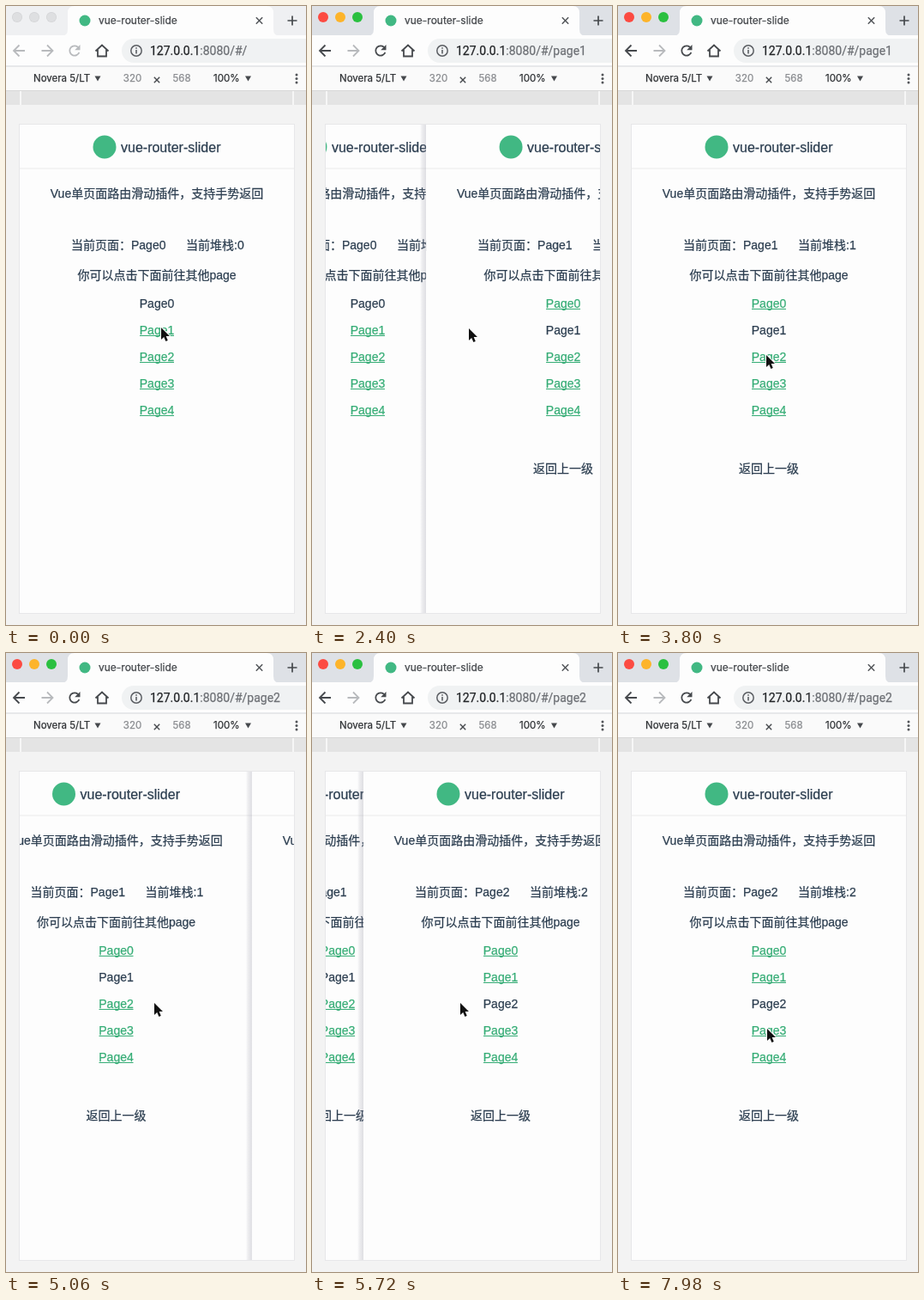
Animation, 350 px wide and 720 px high, one loop 8 s. Source, as an HTML page with a canvas:

```html
<!DOCTYPE html>
<html lang="zh">
<head>
<meta charset="utf-8">
<title>vue-router-slider</title>
<style>
html, body { margin: 0; width: 100%; height: 100%; overflow: hidden; background: #f3f3f3; }
canvas { display: block; width: 350px; height: 720px; }
</style>
</head>
<body>
<canvas id="stage"></canvas>
<script>
const W = 350, H = 720, LOOP = 8000;
const canvas = document.getElementById('stage');
const ctx = canvas.getContext('2d');
const ratio = window.devicePixelRatio || 1;
canvas.width = W * ratio;
canvas.height = H * ratio;

const PAGE_FONT = '"Liberation Sans", "Noto Sans CJK SC", "Noto Sans CJK", sans-serif';
const UI_FONT = 'Inter, Roboto, sans-serif';
const WHITE = '#fdfdfd', BACK = '#f3f3f3', INK = '#2c3e50', LINK = '#36ad76', LOGO = '#41b883';
const ICON = '#46494d', FAINT = '#b8babd';
const VIEW = { x: 16, y: 138, w: 320, h: 568 };

// Times below are in ticks: three ticks every 140 ms, the middle one held longest.
const FOCUS = 8;
const SLIDES = [
  { push: 39, out: 40, enter: 41 },
  { push: 103, out: 103.1, enter: 105 }
];
const OUT_TICKS = 29.4, IN_TICKS = 29.9;
const POINTER = [
  [0, 181, 374], [8, 181, 374], [14, 183, 375], [72, 183, 375],
  [80, 173, 406], [104, 173, 407], [144, 173, 407], [154, 174, 437]
];

const clamp = v => Math.min(1, Math.max(0, v));

function tickAt(ms) {
  const m = ms % 140;
  return 3 * Math.floor(ms / 140) + (m < 20 ? 0 : m < 120 ? 1 : 2);
}

// cubic-bezier(.25, .1, .25, 1)
function ease(v) {
  const x = clamp(v);
  let lo = 0, hi = 1;
  for (let i = 0; i < 24; i++) {
    const p = (lo + hi) / 2;
    if (0.75 * p * (1 - p) + p ** 3 < x) lo = p; else hi = p;
  }
  const q = 1 - lo;
  return 0.3 * lo * q * q + 3 * lo * lo * q + lo ** 3;
}

function pointerAt(n) {
  const i = POINTER.findIndex(k => k[0] > n);
  if (i < 0) return POINTER[POINTER.length - 1].slice(1);
  const [t0, x0, y0] = POINTER[i - 1], [t1, x1, y1] = POINTER[i];
  const p = (n - t0) / (t1 - t0), s = p * p * (3 - 2 * p);
  return [x0 + (x1 - x0) * s, y0 + (y1 - y0) * s];
}

function rect(x, y, w, h, color) {
  ctx.fillStyle = color;
  ctx.fillRect(x, y, w, h);
}

// A hairline stroke gives the slightly heavy look of smoothed text.
function text(str, x, y, font, color, align = 'left') {
  ctx.font = font;
  ctx.fillStyle = ctx.strokeStyle = color;
  ctx.textAlign = align;
  ctx.lineWidth = 0.25;
  ctx.fillText(str, x, y);
  ctx.strokeText(str, x, y);
}

function disc(x, y, r, color) {
  ctx.fillStyle = color;
  ctx.beginPath();
  ctx.arc(x, y, r, 0, Math.PI * 2);
  ctx.fill();
}

function line(color, width, ...paths) {
  ctx.strokeStyle = color;
  ctx.lineWidth = width;
  ctx.beginPath();
  for (const p of paths) {
    ctx.moveTo(p[0], p[1]);
    for (let i = 2; i < p.length; i += 2) ctx.lineTo(p[i], p[i + 1]);
  }
  ctx.stroke();
}

function shape(points, color) {
  ctx.beginPath();
  for (let i = 0; i < points.length; i += 2) ctx.lineTo(points[i], points[i + 1]);
  ctx.closePath();
  ctx.fillStyle = color;
  ctx.fill();
}

function cross(x, y, r, color, width) {
  line(color, width, [x - r, y - r, x + r, y + r], [x - r, y + r, x + r, y - r]);
}

function tabStrip(active) {
  rect(0, 0, W, 35, active ? '#dee1e6' : '#eff0f2');
  ctx.fillStyle = WHITE;
  ctx.beginPath();
  ctx.moveTo(64, 35);
  ctx.quadraticCurveTo(72, 35, 72, 27);
  ctx.lineTo(72, 8);
  ctx.quadraticCurveTo(72, 0, 80, 0);
  ctx.lineTo(304, 0);
  ctx.quadraticCurveTo(312, 0, 312, 8);
  ctx.lineTo(312, 27);
  ctx.quadraticCurveTo(312, 35, 320, 35);
  ctx.fill();
  ['#fc4b42', '#fdb42a', '#2ac040'].forEach((color, i) => {
    const x = 13 + i * 20;
    disc(x, 13, 6, active ? color : '#d2d3d5');
    if (!active) disc(x, 13, 5.3, '#dedfe1');
  });
  disc(92, 17, 6.5, LOGO);
  text('vue-router-slide', 108, 21, `12px ${UI_FONT}`, '#45484c');
  cross(295.5, 17, 3.7, '#53565a', 1.5);
  line('#46494d', 1.7, [328.5, 17, 339.5, 17], [334, 11.5, 334, 22.5]);
}

function arrow(x, dir, color) {
  line(color, 1.8, [x - 6.5 * dir, 52, x + 6.5 * dir, 52], [x, 45.5, x - 6.5 * dir, 52, x, 58.5]);
}

function addressBar(active, canGoBack, path) {
  rect(0, 34, W, 36, WHITE);
  arrow(15.5, 1, canGoBack ? ICON : FAINT);
  arrow(48, -1, FAINT);

  const reload = active ? ICON : FAINT;
  ctx.strokeStyle = reload;
  ctx.lineWidth = 1.8;
  ctx.beginPath();
  ctx.arc(80, 52, 5.7, 0.35, Math.PI * 1.75);
  ctx.stroke();
  shape([86.5, 45, 86.5, 51.3, 80.2, 51.3], reload);
  line(ICON, 1.8, [104.5, 52.5, 112, 45.5, 119.5, 52.5], [107, 51, 107, 58.5, 117, 58.5, 117, 51]);

  ctx.fillStyle = '#f0f2f3';
  ctx.beginPath();
  ctx.roundRect(135, 38, 240, 28, 14);
  ctx.fill();
  ctx.strokeStyle = '#5b5e63';
  ctx.lineWidth = 1.5;
  ctx.beginPath();
  ctx.arc(152, 52, 6.2, 0, Math.PI * 2);
  ctx.stroke();
  line('#5b5e63', 1.6, [152, 51, 152, 55.5], [152, 48.3, 152, 49.8]);

  const font = `14px Roboto, ${UI_FONT}`, host = '127.0.0.1';
  text(host, 168, 57, font, '#222427');
  text(':8080/#/' + path, 168 + ctx.measureText(host).width, 57, font, '#6d7075');
}

function deviceBar() {
  rect(0, 70, W, 29, '#fafafa');
  rect(0, 69.5, W, 1, '#d4d6d9');
  const font = `11.5px ${UI_FONT}`;
  text('Novera 5/LT', 32, 88, font, '#303336');
  shape([103.5, 81.5, 110.5, 81.5, 107, 87.5], ICON);
  text('320', 147.5, 88, font, '#8a8c90', 'center');
  cross(176, 86, 3.2, ICON, 1.4);
  text('568', 205, 88, font, '#8a8c90', 'center');
  text('100%', 242, 88, font, '#303336');
  shape([279, 81.5, 286, 81.5, 282.5, 87.5], ICON);
  for (const y of [80, 84.5, 89]) disc(339, y, 1.5, '#53565a');

  rect(0, 98, W, 17, '#e4e4e4');
  rect(0, 98, W, 1, '#d8d8d8');
  rect(16, 99, 2, 16, '#f6f6f6');
  rect(334, 99, 2, 16, '#f6f6f6');
}

function page(index, dx) {
  const font = `14px ${PAGE_FONT}`;
  ctx.save();
  ctx.translate(dx, 0);
  rect(VIEW.x, VIEW.y, VIEW.w, VIEW.h, WHITE);
  rect(VIEW.x, 188.5, VIEW.w, 1, '#ececec');
  disc(115, 164, 13.5, LOGO);
  text('vue-router-slider', 134, 170, `16px ${PAGE_FONT}`, INK);
  text('Vue单页面路由滑动插件，支持手势返回', 176, 223, font, INK, 'center');
  text('当前页面：Page' + index, 76, 283, font, INK);
  text('当前堆栈:' + index, 210, 283, font, INK);
  text('你可以点击下面前往其他page', 176, 318, font, INK, 'center');
  for (let i = 0; i < 5; i++) {
    const y = 351 + i * 31, current = i === index;
    text('Page' + i, 176, y, font, current ? INK : LINK, 'center');
    if (!current) rect(156, y + 1, 40, 1, LINK);
  }
  if (index > 0) text('返回上一级', 176, 543, font, INK, 'center');
  ctx.restore();
}

function edgeShadow(x) {
  const g = ctx.createLinearGradient(x - 7, 0, x, 0);
  g.addColorStop(0, 'rgba(150,150,165,0)');
  g.addColorStop(0.3, 'rgba(150,150,165,.14)');
  g.addColorStop(1, 'rgba(150,150,165,.3)');
  rect(x - 7, VIEW.y, 7, VIEW.h, g);
}

function viewport(n) {
  rect(0, 115, W, H - 115, BACK);
  rect(VIEW.x - 1, VIEW.y - 1, VIEW.w + 2, VIEW.h + 2, '#e7e7e9');
  ctx.save();
  ctx.beginPath();
  ctx.rect(VIEW.x, VIEW.y, VIEW.w, VIEW.h);
  ctx.clip();
  const last = SLIDES.filter(s => n >= s.out).length;
  if (!last) {
    page(0, 0);
  } else {
    const slide = SLIDES[last - 1];
    const enterX = VIEW.w * (1 - ease((n - slide.enter) / IN_TICKS));
    page(last - 1, -VIEW.w / 2 * ease((n - slide.out) / OUT_TICKS));
    if (enterX > 0.3) edgeShadow(VIEW.x + enterX);
    page(last, enterX);
  }
  ctx.restore();
}

function pointer(x, y) {
  ctx.save();
  ctx.translate(x, y);
  ctx.lineJoin = 'round';
  shape([0, 0, 0, 14, 3.2, 11, 5.4, 16, 7.8, 15, 5.7, 10.1, 10, 10.1], '#111');
  ctx.strokeStyle = '#fff';
  ctx.lineWidth = 2;
  ctx.stroke();
  ctx.fill();
  ctx.restore();
}

function draw(ms) {
  const n = tickAt(ms), active = n >= FOCUS;
  const pushed = SLIDES.filter(s => n >= s.push).length;
  ctx.setTransform(ratio, 0, 0, ratio, 0, 0);
  tabStrip(active);
  addressBar(active, pushed > 0, pushed ? 'page' + pushed : '');
  deviceBar();
  viewport(n);
  pointer(...pointerAt(n));
}

function frame() {
  draw(performance.now() % LOOP);
  requestAnimationFrame(frame);
}
frame();
</script>
</body>
</html>
```
